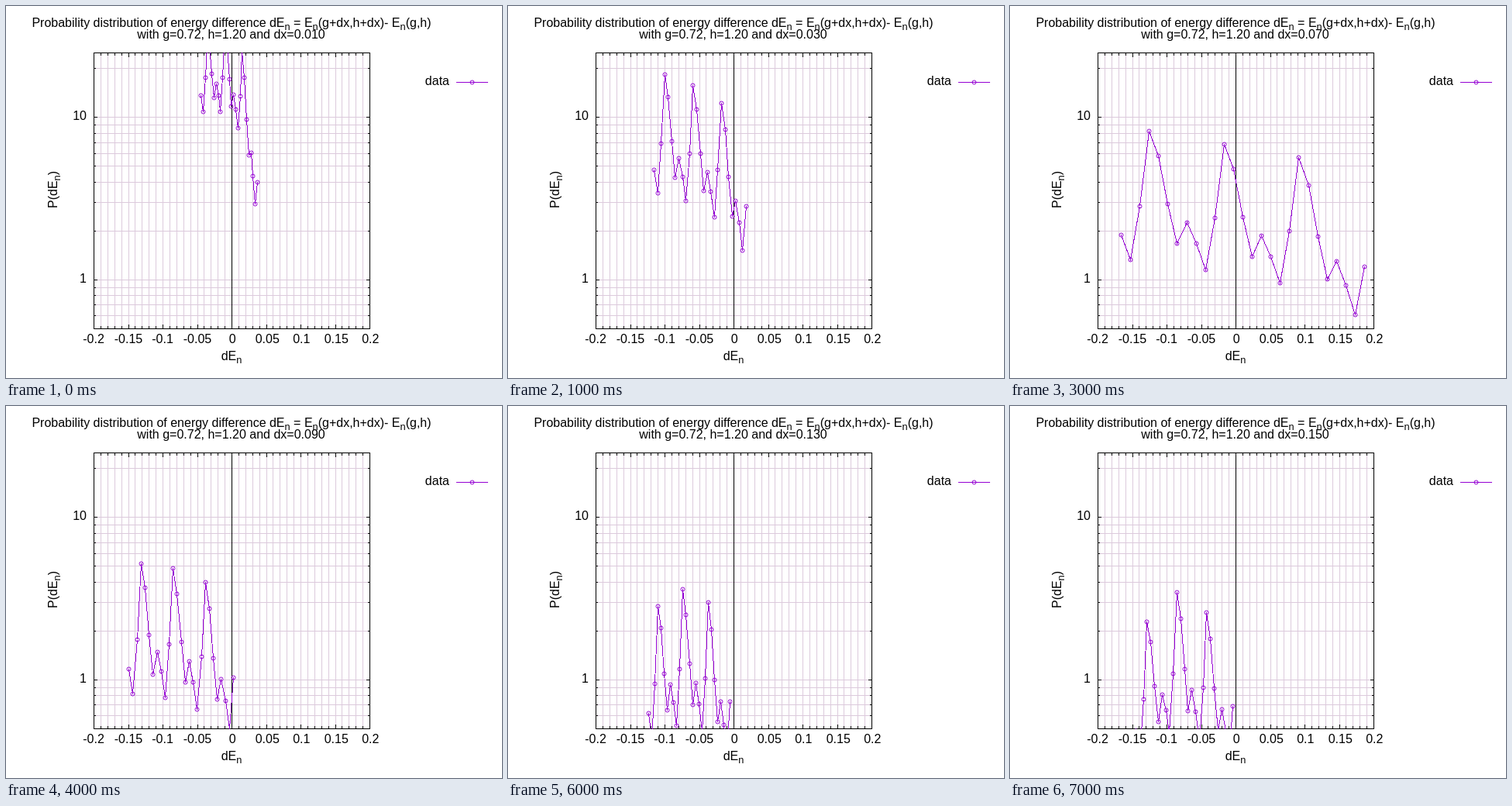
An HTML page that plays this animation: 640x480 px, repeating every 8000 ms.

```html
<!DOCTYPE html>
<html lang="en">
<head>
<meta charset="utf-8">
<title>Energy difference distribution</title>
<style>
  html, body { margin: 0; width: 100%; height: 100%; overflow: hidden; background: #fff; }
  svg { display: block; width: 640px; height: 480px; }
  text { font: 16px "Liberation Sans", Arial, sans-serif; fill: #000; }
  .sub { font-size: 12.8px; }
  path, polyline, rect { fill: none; shape-rendering: crispEdges; }
  circle { fill: none; }
  .grid { stroke: #dccadc; }
  .axis { stroke: #000; }
  .data { stroke: #9400d3; }
</style>
</head>
<body>
<svg viewBox="0 0 640 480">
  <defs><clipPath id="area"><rect x="113" y="60" width="357" height="357"/></clipPath></defs>
  <path id="grid" class="grid"/>
  <path id="ticks" class="axis"/>
  <rect class="axis" x="113.5" y="60.5" width="356" height="356"/>
  <path class="axis" d="M291.5 60V416"/>
  <g id="labels"></g>
  <text x="291" y="27" text-anchor="middle">Probability distribution of energy difference dE<tspan class="sub" dy="4">n</tspan><tspan dy="-4"> = E</tspan><tspan class="sub" dy="4">n</tspan><tspan dy="-4">(g+dx,h+dx)- E</tspan><tspan class="sub" dy="4">n</tspan><tspan dy="-4">(g,h)</tspan></text>
  <text id="params" x="290.5" y="42" text-anchor="middle"></text>
  <text x="291" y="457" text-anchor="middle">dE<tspan class="sub" dy="4">n</tspan></text>
  <text transform="translate(66 237) rotate(-90)" text-anchor="middle">P(dE<tspan class="sub" dy="4">n</tspan><tspan dy="-4">)</tspan></text>
  <text x="572" y="102" text-anchor="end">data</text>
  <path class="data" d="M581 98.5H622"/>
  <circle class="data" cx="601.5" cy="98.5" r="2.5"/>
  <g id="plot"></g>
</svg>
<script>
const STEP_MS = 1000;
const BINS = 27;
const BOX = { left: 113, right: 469, top: 60, bottom: 416 };

// Every spectrum repeats this dip below its crest line, with crests at bins 3, 11, 19 and 27.
const DIP = [0, 32, 95, 147, 116, 142, 176, 103];
const FIRST_CREST = 3;

// First and last bin in x, then the heights of the four crests.
const STEPS = [
  { x: [251.2, 324], crests: [30, 30, 58, 180] },
  { x: [188, 307], crests: [88, 102, 125, 175] },
  { x: [167, 295.8], crests: [133, 148, 168, 205] },
  { x: [143, 457], crests: [161, 178, 195, 245] },
  { x: [158.3, 293], crests: [203, 209, 227, 255] },
  { x: [199, 285.2], crests: [235, 226, 231, 270] },
  { x: [181, 286], crests: [258, 236, 253, 285] },
  { x: [162, 287.2], crests: [278, 240, 266, 290] }
];

const $ = id => document.getElementById(id);
const lerp = (a, b, t) => a + (b - a) * t;
const snap = v => Math.round(v) + 0.5;
const px = v => snap(291 + v * 890);
const py = v => snap(BOX.bottom - 209.54 * Math.log10(v / 0.5));
const dxOf = step => 0.01 + step * 0.02;

function add(parent, name, attrs, text = "") {
  const node = document.createElementNS("http://www.w3.org/2000/svg", name);
  for (const key in attrs) node.setAttribute(key, attrs[key]);
  node.textContent = text;
  parent.append(node);
  return node;
}

function drawAxes() {
  let grid = "", ticks = "";
  for (let i = 0; i <= 40; i++) {
    const v = (i - 20) / 100, x = px(v), len = i % 5 ? 3 : 5;
    if (i % 40) grid += `M${x} ${BOX.top}V${BOX.bottom}`;
    ticks += `M${x} ${BOX.bottom}v${-len}M${x} ${BOX.top + 1}v${len}`;
    if (i % 5 === 0) {
      add($("labels"), "text", { x: x + (v < 0 ? -0.5 : 0.8), y: 435, "text-anchor": "middle" }, v);
    }
  }
  for (const unit of [0.1, 1, 10]) {
    for (let k = 1; k < 10; k++) {
      const v = unit * k;
      if (v < 0.55 || v > 24) continue;
      const y = py(v), len = k === 1 ? 5 : 3;
      grid += `M${BOX.left} ${y}H${BOX.right}`;
      ticks += `M${BOX.left} ${y}h${len}M${BOX.right + 1} ${y}h${-len}`;
      if (k === 1) add($("labels"), "text", { x: 104, y: y + 3.5, "text-anchor": "end" }, unit);
    }
  }
  $("grid").setAttribute("d", grid);
  $("ticks").setAttribute("d", ticks);
}

function binHeight(bin, crests, depth) {
  const period = DIP.length;
  const cycle = Math.max(0, (bin - FIRST_CREST) / period);
  const k = Math.floor(cycle);
  const phase = (bin - FIRST_CREST + period) % period;
  return lerp(crests[k], crests[k + 1], cycle - k) + depth * DIP[phase];
}

function drawSpectrum({ x, crests }, step) {
  const group = add($("plot"), "g", { class: "data", visibility: "hidden" });
  const depth = 1 - 0.004 / dxOf(step);
  const points = Array.from({ length: BINS }, (_, i) => [
    snap(lerp(x[0], x[1], i / (BINS - 1))),
    snap(binHeight(i, crests, depth))
  ]);
  add(group, "polyline", { points: points.join(" "), "clip-path": "url(#area)" });
  for (const [cx, cy] of points) {
    if (cy > BOX.top && cy < BOX.bottom) add(group, "circle", { cx, cy, r: 2.5 });
  }
  return group;
}

drawAxes();
const groups = STEPS.map(drawSpectrum);
let shown = -1;

function show(step) {
  if (step === shown) return;
  shown = step;
  groups.forEach((g, i) => g.setAttribute("visibility", i === step ? "visible" : "hidden"));
  $("params").textContent = `with g=0.72, h=1.20 and dx=${dxOf(step).toFixed(3)}`;
}

const start = performance.now();
function tick() {
  show(Math.floor((performance.now() - start) / STEP_MS) % groups.length);
  requestAnimationFrame(tick);
}
tick();
</script>
</body>
</html>
```
